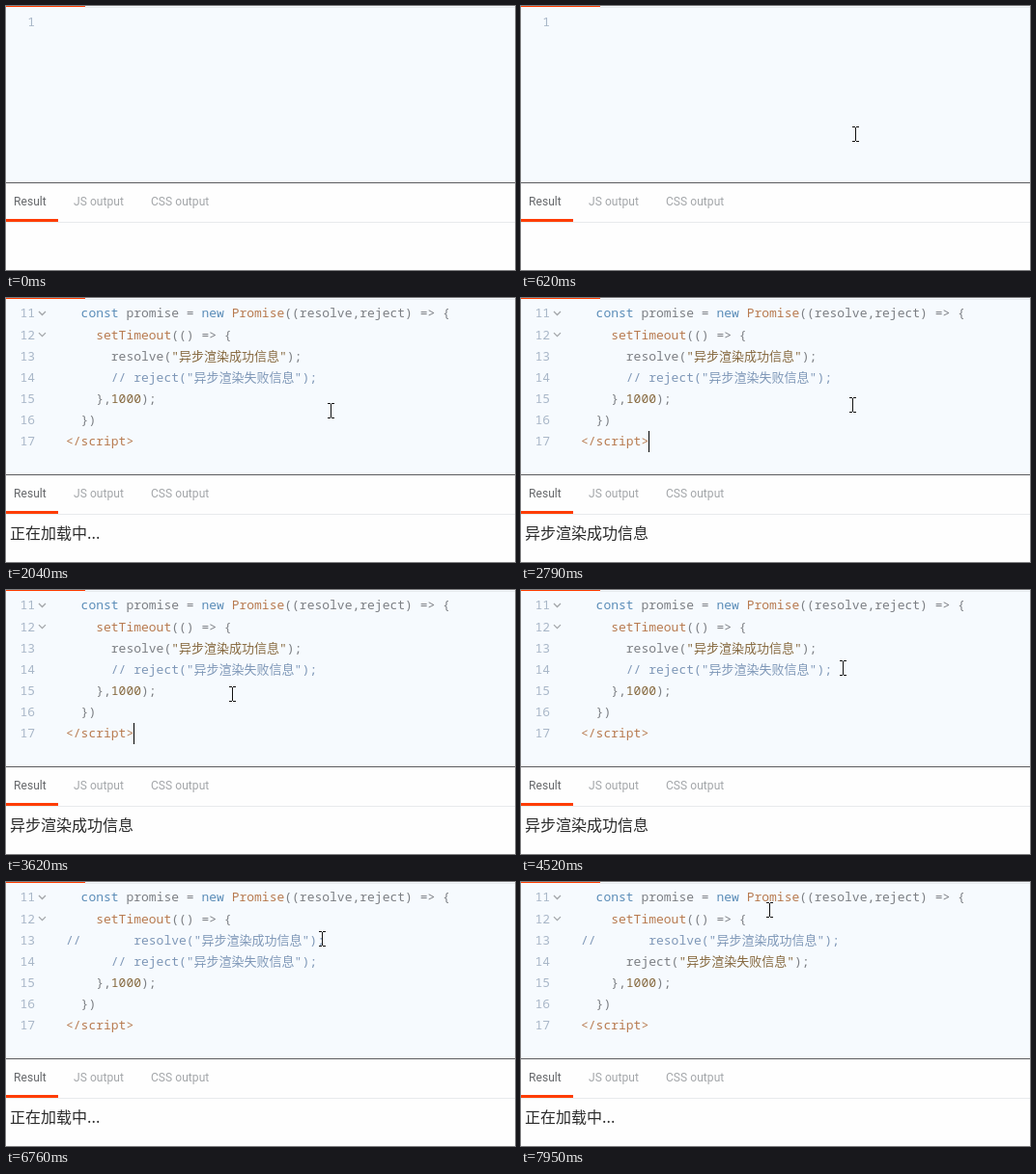
These frames come from a looping animation (527x274 px, 8000 ms). An HTML page with a canvas:

```html
<!DOCTYPE html>
<html lang="zh">
<head>
<meta charset="utf-8">
<title>Promise demo</title>
<style>
  html, body { margin: 0; width: 100%; height: 100%; overflow: hidden; background: #fff; }
  #stage { position: absolute; left: 0; top: 0; width: 527px; height: 274px; overflow: hidden; }
  canvas { position: absolute; left: 0; top: 0; }
  #code, #tabs, #result { position: absolute; left: 0; white-space: pre; }
  #code { top: 0; width: 527px; height: 183px; overflow: hidden;
          font: 13px/22px "Noto Sans Mono", "Noto Sans CJK SC", monospace;
          font-variant-ligatures: none; color: #7c7f84; }
  #code div { position: absolute; left: 62px; }
  #code .num { left: 0; width: 30px; text-align: right; color: #a9b7c8; }
  .key { color: #5b8db8; }
  .type, .tag { color: #b87b50; }
  .str { color: #86693f; }
  .note { color: #7f98b8; }
  #tabs { top: 194px; font: 12px/18px Roboto, sans-serif; letter-spacing: .06px; color: #a3a6a9; }
  #tabs span { position: absolute; top: 0; }
  #tabs .on { color: #66686b; }
  #result { left: 4px; top: 231px; font: 16px/24px "Noto Sans CJK SC", sans-serif; color: #2b2b2b; }
</style>
</head>
<body>
<div id="stage">
  <canvas id="base" width="527" height="274"></canvas>
  <div id="code"></div>
  <div id="tabs">
    <span class="on" style="left:8px">Result</span>
    <span style="left:70px">JS output</span>
    <span style="left:150px">CSS output</span>
  </div>
  <div id="result"></div>
  <canvas id="over" width="527" height="274"></canvas>
</div>
<script>
const LOOP = 8000, LINE = 22.1, LEFT = 62, BLINK = 530;
const PASTE = 1350, FOLD = 1550, MUTE = 5880, UNMUTE = 7230;
const DONE = '异步渲染成功信息', FAIL = '异步渲染失败信息', WAIT = '正在加载中...';
const $ = id => document.getElementById(id);
const base = $('base').getContext('2d');
const over = $('over').getContext('2d');

// [time, line]: the caret goes to the end of that line and restarts its blink
const carets = [[630, 1], [PASTE, 17], [5080, 13], [MUTE, 13], [6210, 14], [UNMUTE, 14]];
const results = [[0, ''], [1410, WAIT], [2440, DONE], [6010, WAIT]];

// [start, end, x, y]: each stroke leaves from where the last one ended
const strokes = [
  [130, 750, 329, 118], [1550, 1770, 335, 118], [1910, 2460, 343, 111],
  [2790, 3620, 234, 108], [3620, 4400, 294, 85], [4400, 4520, 333, 81],
  [4520, 4940, 332, 58], [5080, 5210, 327, 59], [7760, 7950, 257, 29]
];

const latest = (list, t) => list.filter(e => e[0] <= t).pop();
const lineTop = n => n === 1 ? 6 : 5 + (n - 11) * LINE;

function mouseAt(t) {
  if (t < strokes[0][0]) return null;
  let x = 485, y = 255;
  for (const [start, end, toX, toY] of strokes) {
    const u = Math.max(0, Math.min(1, (t - start) / (end - start)));
    const ease = u * u * (3 - 2 * u);
    x += (toX - x) * ease;
    y += (toY - y) * ease;
  }
  return [Math.round(x), Math.round(y)];
}

function lineText(n, t) {
  return {
    11: '  const promise = new Promise((resolve,reject) => {',
    12: '    setTimeout(() => {',
    13: `${t < MUTE ? '' : '// '}      resolve("${DONE}");`,
    14: `      ${t < UNMUTE ? '// ' : ''}reject("${FAIL}");`,
    15: '    },1000);',
    16: '  })',
    17: '<\/script>'
  }[n] || '';
}

const rules = [
  ['note', /^\/\//], ['str', /^("|\d)/], ['key', /^(const|new)$/],
  ['type', /^(Promise|setTimeout)$/], ['tag', /^</]
];

function highlight(text) {
  return text.replace(/\/\/.*|"[^"]*"|<\/.*|\w+|[<>]/g, word => {
    const rule = rules.find(([, test]) => test.test(word));
    const safe = word.replace(/</g, '&lt;').replace(/>/g, '&gt;');
    return rule ? `<span class="${rule[0]}">${safe}</span>` : safe;
  });
}

function codeHtml(t) {
  const numbers = t < PASTE ? [1] : Array.from({ length: 7 }, (_, i) => 11 + i);
  return numbers.map(n => {
    const top = `style="top:${Math.round(lineTop(n) - .6)}px"`;
    return `<div class="num" ${top}>${n}</div><div ${top}>${highlight(lineText(n, t))}</div>`;
  }).join('');
}

const shown = {};
function put(id, html) {
  if (shown[id] === html) return;
  shown[id] = html;
  $(id).innerHTML = html;
}

function box(c, color, x, y, w, h) {
  c.fillStyle = color;
  c.fillRect(x, y, w, h);
}

function drawBase() {
  box(base, '#f6fafe', 0, 0, 527, 183);
  box(base, '#e6eaed', 82, 1, 445, 1);
  box(base, '#ff3d00', 0, 0, 82, 1);
  box(base, '#5c5c5e', 0, 183, 527, 1);
  box(base, '#fefefe', 0, 184, 527, 90);
  box(base, '#e8eaec', 0, 224, 527, 1);
  box(base, '#ff3d00', 0, 221, 54, 3);
}

function drawCaret(t) {
  const caret = latest(carets, t);
  if (!caret || (t - caret[0]) % (2 * BLINK) >= BLINK) return;
  const [, n] = caret;
  const width = [...lineText(n, t)].reduce((sum, c) => sum + (c > '\u2e80' ? 13 : 7.8), 0);
  box(over, '#000', Math.round(LEFT + width), Math.round(lineTop(n)), 1, 22);
}

function drawFold(y) {
  over.strokeStyle = '#a2a5a9';
  over.lineWidth = 1.3;
  over.beginPath();
  over.moveTo(34, y);
  over.lineTo(37.5, y + 3.5);
  over.lineTo(41, y);
  over.stroke();
}

function drawBeam(x, y) {
  box(over, '#111', x, y - 7, 1, 14);
  for (const dy of [-8, 7]) {
    box(over, '#111', x - 3, y + dy, 3, 1);
    box(over, '#111', x + 1, y + dy, 3, 1);
  }
}

function drawArrow(x, y) {
  const shape = [[0, 0], [0, 16], [4, 12.5], [6.5, 18], [9, 17], [6.5, 11.5], [11.5, 11.5]];
  over.beginPath();
  shape.forEach(([dx, dy]) => over.lineTo(x + dx + .5, y + dy + .5));
  over.closePath();
  over.fillStyle = '#fff';
  over.fill();
  over.strokeStyle = '#111';
  over.lineWidth = 1;
  over.stroke();
}

function draw(t) {
  put('code', codeHtml(t));
  put('result', latest(results, t)[1]);
  over.clearRect(0, 0, 527, 274);
  if (t >= FOLD) [11, 12].forEach(n => drawFold(lineTop(n) + 9));
  drawCaret(t);
  const mouse = mouseAt(t);
  if (mouse) (mouse[1] > 184 ? drawArrow : drawBeam)(...mouse);
}

const begin = performance.now();
function tick() {
  draw((performance.now() - begin) % LOOP);
  requestAnimationFrame(tick);
}
drawBase();
tick();
</script>
</body>
</html>
```
